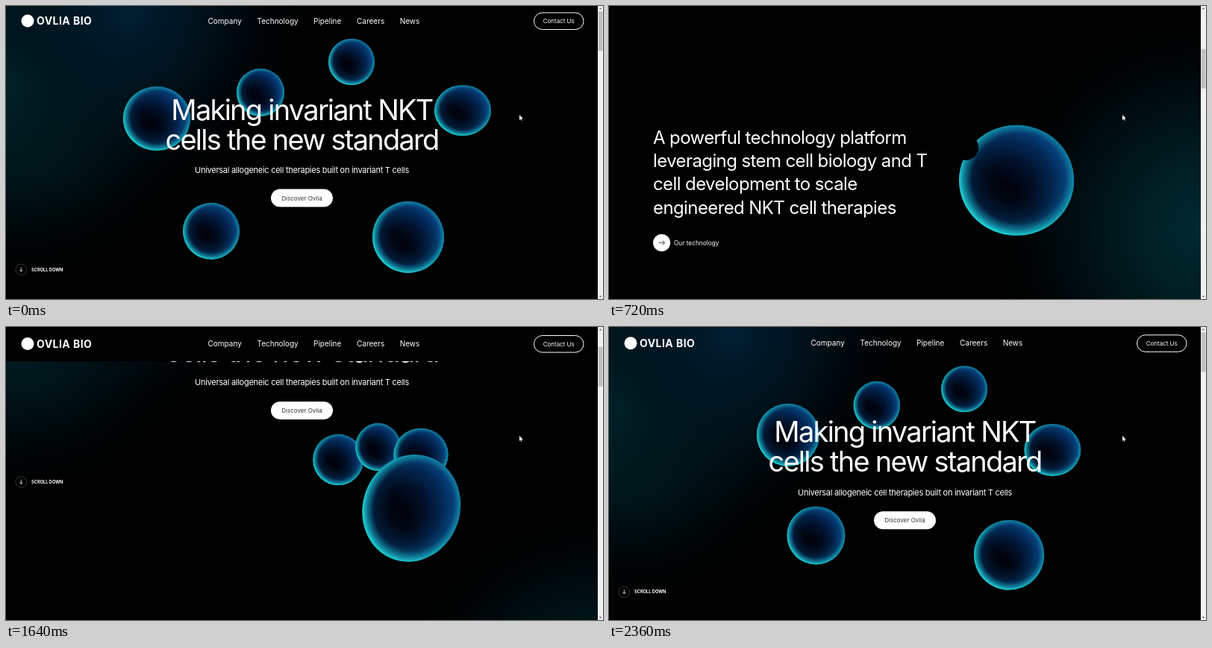
An HTML page for the animation above (2430 ms loop, 800x393 px).

```html
<!DOCTYPE html>
<html lang="en">
<head>
<meta charset="utf-8">
<title>Cell therapy page</title>
<style>
  html, body { margin: 0; width: 100%; height: 100%; overflow: hidden; background: #000; }
  svg { display: block; width: 100vw; height: 100vh; }
  text { font-family: Inter, Roboto, sans-serif; font-optical-sizing: none; fill: #fff; }
  .mid { text-anchor: middle; }
  .title { font-size: 38px; letter-spacing: -1.75px; }
  .sub { font-size: 11px; letter-spacing: -.27px; }
  .lead { font-size: 24px; letter-spacing: -.6px; }
  .nav { font-size: 10px; }
  .small { font-size: 8px; }
  .line { fill: none; stroke: #fff; }
</style>
</head>
<body>
<svg viewBox="0 0 800 393" preserveAspectRatio="none">
  <defs>
    <radialGradient id="teal" gradientUnits="userSpaceOnUse" cx="10" cy="105" r="270">
      <stop offset="0" stop-color="#00292f"/>
      <stop offset=".5" stop-color="#001c22" stop-opacity=".7"/>
      <stop offset="1" stop-color="#000c10" stop-opacity="0"/>
    </radialGradient>
    <radialGradient id="blue" gradientUnits="userSpaceOnUse" cx="165" cy="10" r="240">
      <stop offset="0" stop-color="#001f33"/>
      <stop offset=".5" stop-color="#00131f" stop-opacity=".7"/>
      <stop offset="1" stop-color="#00080e" stop-opacity="0"/>
    </radialGradient>
    <radialGradient id="glow" gradientUnits="userSpaceOnUse" cx="800" cy="680" r="290">
      <stop offset="0" stop-color="#002a31"/>
      <stop offset=".35" stop-color="#002026" stop-opacity=".9"/>
      <stop offset=".7" stop-color="#001015" stop-opacity=".6"/>
      <stop offset="1" stop-color="#000809" stop-opacity="0"/>
    </radialGradient>
    <radialGradient id="core" cx=".46" cy=".5" r=".54">
      <stop offset="0" stop-color="#000007"/>
      <stop offset=".35" stop-color="#000613"/>
      <stop offset=".65" stop-color="#021b38"/>
      <stop offset=".85" stop-color="#063f68"/>
      <stop offset="1" stop-color="#0b6a92"/>
    </radialGradient>
    <linearGradient id="shade" x1=".9" y1=".1" x2=".45" y2=".6">
      <stop offset="0" stop-color="#063c88" stop-opacity=".6"/>
      <stop offset="1" stop-color="#063c88" stop-opacity="0"/>
    </linearGradient>
    <radialGradient id="rim" cx=".52" cy=".48" r=".52">
      <stop offset=".78" stop-color="#0f8fa8" stop-opacity="0"/>
      <stop offset=".9" stop-color="#14a3b4" stop-opacity=".55"/>
      <stop offset="1" stop-color="#1fd6d6" stop-opacity=".95"/>
    </radialGradient>
    <g id="cell">
      <circle r="1" fill="url(#core)"/>
      <circle r="1" fill="url(#shade)"/>
      <circle r="1" fill="url(#rim)"/>
    </g>
    <clipPath id="lens"><circle id="lensEdge" r="0"/></clipPath>
  </defs>

  <rect width="800" height="393"/>
  <g class="page">
    <rect width="800" height="900" fill="url(#teal)"/>
    <rect width="800" height="900" fill="url(#blue)"/>
    <rect width="800" height="1000" fill="url(#glow)"/>
  </g>

  <g id="cells">
    <use href="#cell"/><use href="#cell"/><use href="#cell"/>
    <use href="#cell"/><use href="#cell"/><use href="#cell"/>
  </g>

  <g id="inset">
    <circle id="hole" r="0"/>
    <g clip-path="url(#lens)" fill="none">
      <g id="arcs" stroke="#4a4a4a" stroke-width=".6"></g>
      <path d="M-13-30L32 18" stroke="#aaa" stroke-width=".9"/>
      <g stroke="#999" stroke-width=".7">
        <path d="M-21-35q9 0 17 2q4 8-3 9q-9 0-12-10M-17-32q8 7 13 3"/>
        <g transform="translate(10 -6) rotate(47)"><rect x="-6" y="-3" width="12" height="6" rx="2"/><path d="M-6-1H6M-6 1H6"/></g>
        <g transform="translate(24 9) rotate(47)"><rect x="-6" y="-3" width="12" height="6" rx="2"/><path d="M-6-1H6M-6 1H6"/></g>
      </g>
    </g>
  </g>

  <g class="page">
    <g class="mid">
      <text class="title" x="396.5" y="155">Making invariant NKT</text>
      <text class="title" x="396.5" y="195">cells the new standard</text>
      <text class="sub" x="396.5" y="226.5">Universal allogeneic cell therapies built on invariant T cells</text>
      <rect x="355" y="248" width="83" height="24" rx="12" fill="#fff"/>
      <text class="small" x="396.5" y="263" style="fill:#333">Discover Ovlia</text>
    </g>
    <circle cx="20.3" cy="356" r="7.4" class="line" style="stroke:#3c4244" stroke-width=".8"/>
    <path d="M20.3 353v5.6m-2-2l2 2l2-2" class="line" stroke-width=".8"/>
    <text x="34" y="358.2" font-size="5.7" font-weight="700">SCROLL DOWN</text>

    <g class="lead">
      <text x="59" y="565">A powerful technology platform</text>
      <text x="59" y="596.3">leveraging stem cell biology and T</text>
      <text x="59" y="627.6">cell development to scale</text>
      <text x="59" y="659">engineered NKT cell therapies</text>
    </g>
    <circle cx="70.6" cy="698" r="11.6" fill="#fff"/>
    <path d="M66.5 698h8m-3-3l3 3l-3 3" class="line" style="stroke:#222" stroke-width=".8"/>
    <text x="87" y="701" font-size="8.3">Our technology</text>
  </g>

  <g id="header">
    <rect id="bar" width="793" height="46"/>
    <circle cx="29" cy="22.5" r="8.5" fill="#fff"/>
    <text x="41" y="27.5" font-size="14" font-weight="700" letter-spacing=".45">OVLIA BIO</text>
    <g class="nav">
      <text x="270.5" y="26">Company</text>
      <text x="336.5" y="26">Technology</text>
      <text x="412" y="26">Pipeline</text>
      <text x="470" y="26">Careers</text>
      <text x="527.7" y="26">News</text>
    </g>
    <rect x="707.5" y="11.5" width="66.5" height="22.5" rx="11.25" class="line"/>
    <text class="small mid" x="740.7" y="25.6">Contact Us</text>
  </g>

  <path d="M688 146v7l1.7-1.5l1 2.2l1-.4l-1-2.2h2.2z" fill="#fff"/>

  <rect x="793" width="7" height="393" fill="#f1f1f1"/>
  <rect id="thumb" x="793.5" width="6" height="53" fill="#c1c1c1"/>
  <path d="M794.8 4.2l1.7-2l1.7 2zM794.8 388.8l1.7 2l1.7-2z" fill="#505050"/>
</svg>

<script>
const LOOP = 2430, STEPS = 37, STEP = LOOP / STEPS;
const $ = id => document.getElementById(id);
const pages = document.querySelectorAll('.page');
const cells = $('cells').children;
const shift = (el, x, y) => el.setAttribute('transform', `translate(${x} ${y})`);

// Monotone cubic through (ts, vs), level at both ends
function curve(ts, vs) {
  const d = vs.slice(1).map((v, i) => (v - vs[i]) / (ts[i + 1] - ts[i]));
  const m = vs.map((v, i) => {
    const a = d[i - 1] || 0, b = d[i] || 0;
    return a * b > 0 ? 2 * a * b / (a + b) : 0;
  });
  return t => {
    if (t <= ts[0]) return vs[0];
    const n = ts.length - 1;
    if (t >= ts[n]) return vs[n];
    let i = 0;
    while (t > ts[i + 1]) i++;
    const h = ts[i + 1] - ts[i], u = (t - ts[i]) / h, w = 1 - u;
    return w * w * ((1 + 2 * u) * vs[i] + u * h * m[i]) +
           u * u * ((3 - 2 * u) * vs[i + 1] - w * h * m[i + 1]);
  };
}

// Rows of [x, y, rx, ry, tilt] turned into one curve per column
const track = (ts, rows) => rows[0].map((_, c) => curve(ts, rows.map(r => r[c])));

const scrollAt = curve([0, 260, 720, 990, 1080, 1380, 1840, 2360],
                       [2.5, 118, 380, 405, 408, 326.5, 45, 0]);
const pinAt = curve([1250, 1380, 1460, 1720, 1840], [-46, -13, 0, 0, -44]);

// The small cells run into the large one and come out again
const small = (start, early, late, end) => {
  const inside = [550, 232, early[2], early[3]];
  return track([0, 260, 620, 1480, 1840, 2360], [start, early, inside, inside, late, end]);
};
const tracks = [
  small([202, 151, 45, 43], [206.5, 150, 46, 43], [530, 262, 42, 42], [229, 140, 42, 42]),
  small([341, 116, 32, 32], [333, 108, 33, 33], [303, 105, 35, 36], [361, 105, 31, 32]),
  small([463, 75, 31, 31], [459, 63, 30, 32], [429, 65, 31, 32], [478, 84, 31, 31]),
  small([612, 140, 38, 34], [602, 124, 37, 35], [569, 88, 36, 35], [595, 168, 38, 35]),
  small([275, 302, 38, 38], [522, 285, 38, 38], [530, 262, 38, 38], [268, 280, 39, 39]),
  track([0, 260, 720, 990, 1380, 1840, 2360], [
    [539, 310, 48, 48, 0], [532, 283, 52, 52, 0], [546, 234, 77, 74, 0],
    [553, 223, 78, 74, 0], [552.5, 225, 77, 74, 0], [537, 263, 55, 70, 32],
    [536, 307, 47, 46, 0]
  ])
];

let arcs = '';
for (let i = 0; i < 5; i++) {
  const x = i * 7, y = i * 5;
  arcs += `<path d="M${x - 24} ${y + 30}Q${x - 14} ${y - 14} ${x + 20} ${y - 32}"/>`;
}
$('arcs').innerHTML = arcs;

function draw(t) {
  const s = scrollAt(t);
  pages.forEach(p => shift(p, 0, -s));

  tracks.forEach((tr, i) => {
    const [x, y, rx, ry, tilt = 0] = tr.map(f => f(t));
    cells[i].setAttribute('transform', `translate(${x} ${y}) rotate(${tilt}) scale(${rx} ${ry})`);
  });

  const r = Math.max(0, (s - 359) * .8), k = (s - 380) / 25;
  shift($('inset'), 478 + 5 * k, 190 - 13 * k);
  $('hole').setAttribute('r', r);
  $('lensEdge').setAttribute('r', r);
  $('arcs').parentNode.setAttribute('opacity', Math.min(1, Math.max(0, (r - 17) / 15)));

  const pinned = t > 1250 && t < 1870;
  shift($('header'), 0, pinned ? Math.max(pinAt(t), -s) : -s);
  $('bar').setAttribute('opacity', pinned ? 1 : 0);
  $('thumb').setAttribute('y', 7 + s / 7.5);
}

function tick(now) {
  draw(Math.floor((now % LOOP + 3) / STEP) % STEPS * STEP);
  requestAnimationFrame(tick);
}
draw(0);
requestAnimationFrame(tick);
</script>
</body>
</html>
```
